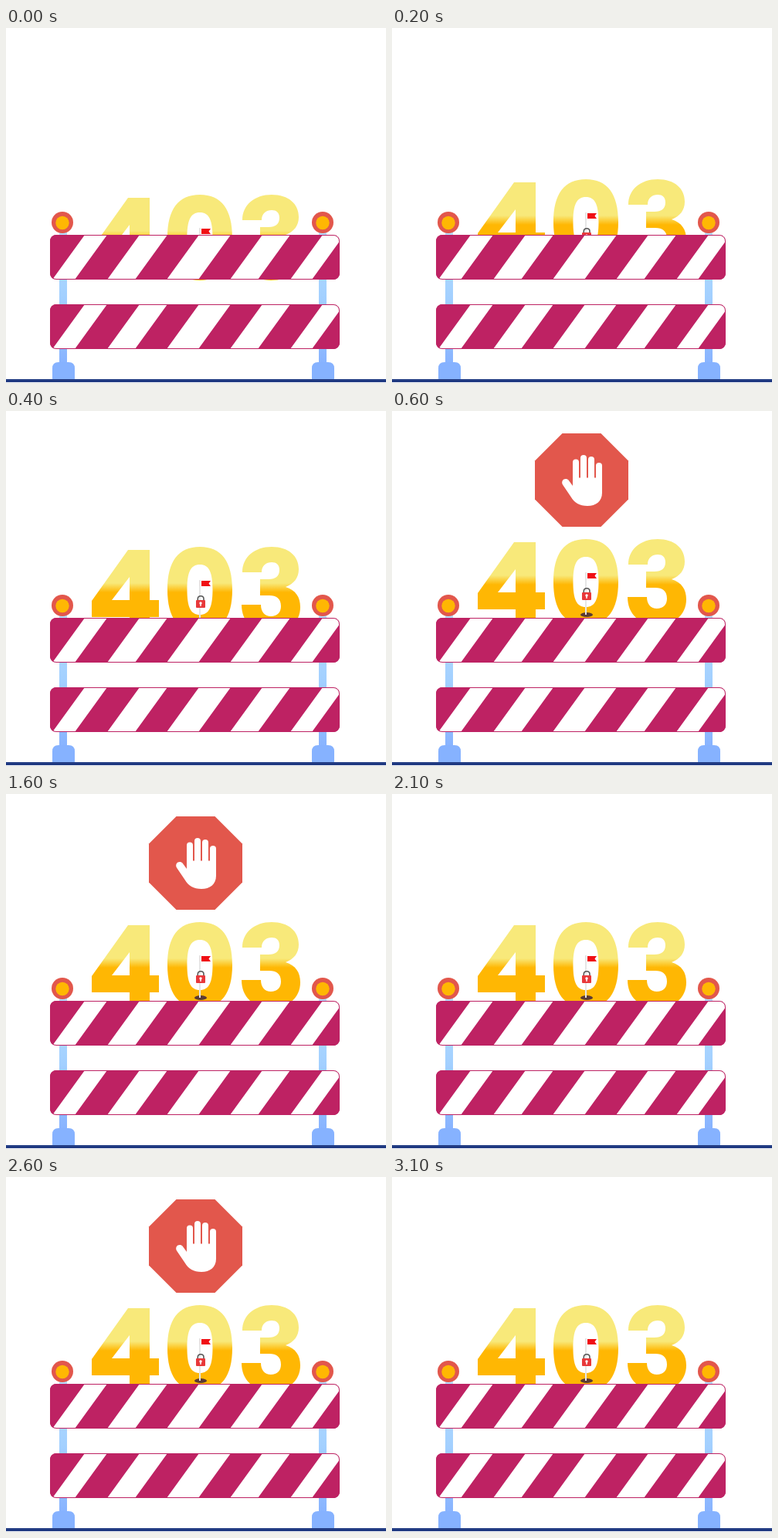
These frames come from a looping animation (492 by 460 pixels, 3600 ms). An HTML page:

```html
<!DOCTYPE html>
<html lang="en">
<head>
<meta charset="utf-8">
<title>403</title>
<style>
html, body { margin: 0; width: 100%; height: 100%; overflow: hidden; background: #fff; }
svg { display: block; width: 492px; height: 460px; }
</style>
</head>
<body>
<svg viewBox="0 0 492 460" role="img" aria-label="403">
  <defs>
    <linearGradient id="gold" gradientUnits="userSpaceOnUse" x1="0" y1="213" x2="0" y2="225">
      <stop offset="0" stop-color="#f8e97a"/>
      <stop offset="1" stop-color="#ffb703"/>
    </linearGradient>
    <linearGradient id="steel" gradientUnits="userSpaceOnUse" x1="0" y1="262" x2="0" y2="434">
      <stop offset="0" stop-color="#b4deff"/>
      <stop offset=".5" stop-color="#a3d0ff"/>
      <stop offset="1" stop-color="#88b3ff"/>
    </linearGradient>
    <clipPath id="board"><rect x="57" y="0" width="375" height="58" rx="8"/></clipPath>
  </defs>

  <g id="sign">
    <path fill="#e2574c" d="M220.5 29H270.5L306 64.5V114.500L270.500 150H220.500L185 114.500V64.500Z"/>
    <g fill="#fff">
      <rect x="234" y="62.500" width="8" height="40" rx="4"/>
      <rect x="244" y="57" width="8" height="40" rx="4"/>
      <rect x="254" y="59" width="8" height="40" rx="4"/>
      <rect x="264" y="67" width="8" height="40" rx="4"/>
      <path d="M234 86.500H272V106C272 117 264 123 253 123C243 123 236 119 231.500 111L221 95.500C218 90 224 85.500 228.500 89.500L234 97Z"/>
    </g>
  </g>

  <g id="digits">
    <g fill="url(#gold)" fill-rule="evenodd">
      <path d="M158 170H186V235H198V257H186V275H160V257H111V236ZM160 205L137 235H160Z"/>
      <path d="M251 166C279 166 293 185 293 221.500C293 258 279 277 251 277C223 277 209 258 209 221.500C209 185 223 166 251 166ZM251 189C239 189 234.500 199 234.500 221.500C234.500 244 239 254 251 254C263 254 267.500 244 267.500 221.500C267.500 199 263 189 251 189Z"/>
      <path d="M306 199C306 179 322 166 344 166C366 166 379 178 379 195C379 206 373 214 362 218C375 222 381 231 381 244C381 264 366 277 343 277C320 277 305 263 305 241H330C330 250 335 256 343 256C351 256 356 251 356 243C356 233 350 229 341 229H329V208H340C349 208 354 204 354 196C354 189 350 186 344 186C337 186 331 190 331 199Z"/>
    </g>
    <ellipse cx="252" cy="264" rx="8" ry="3" fill="#5b3a33"/>
    <rect x="250" y="209" width="2" height="55" fill="#e6e6e6"/>
    <path fill="#f00f14" d="M253 210H265L262.500 213.500L265 217H253Z"/>
    <path fill="none" stroke="#555" stroke-width="1.600" d="M248.300 236V233.500C248.300 228.500 256 228.500 256 233.500V236"/>
    <rect x="246" y="235" width="12" height="10" rx="1" fill="#e8383a"/>
    <circle cx="252" cy="239" r="1.700" fill="#fff"/>
    <rect x="251.300" y="239" width="1.400" height="4" fill="#fff"/>
  </g>

  <g id="barrier"></g>
  <rect y="455" width="492" height="4" fill="#203a82"/>
</svg>
<script>
const get = id => document.getElementById(id);
const sign = get('sign'), digits = get('digits');

const LOOP = 3600, STEP = 100, BLINK = 500, RISEN = 600;

// Bottom edges of the white stripes; each leans right by LEAN.
const STRIPES = [[60, 89], [131, 167], [208, 249], [290, 326], [368, 396]];
const LEAN = 42;

const post = (x, lampX) => `
  <rect x="${x - 5}" y="262" width="10" height="174" fill="url(#steel)"/>
  <path fill="#86b2ff" d="M${x - 14} 455V441q0 -8 8 -8h13q8 0 8 8V455Z"/>
  <circle cx="${lampX}" cy="252" r="14" fill="#e2574c"/>
  <circle cx="${lampX}" cy="252.500" r="8.700" fill="#ffb703"/>`;

const stripe = ([a, b]) => `M${a} 58H${b}L${b + LEAN} 0H${a + LEAN}Z`;

const board = y => `
  <g transform="translate(0 ${y})">
    <rect x="57" width="375" height="58" rx="8" fill="#be2263"/>
    <path clip-path="url(#board)" fill="#fff" d="${STRIPES.map(stripe).join('')}"/>
    <rect x="57.500" y=".5" width="374" height="57" rx="7.500" fill="none" stroke="#be2263"/>
  </g>`;

get('barrier').innerHTML = post(74, 73) + post(410, 410) + board(268) + board(358);

function draw(t) {
  const drop = Math.max(0, 50 - 10 * Math.floor(t / STEP));
  const shown = t >= RISEN && Math.floor((t - RISEN) / BLINK) % 2 === 0;
  digits.setAttribute('transform', `translate(0 ${drop})`);
  sign.setAttribute('visibility', shown ? 'visible' : 'hidden');
}

const start = performance.now();
function tick() {
  draw((performance.now() - start) % LOOP);
  requestAnimationFrame(tick);
}
tick();
</script>
</body>
</html>
```
